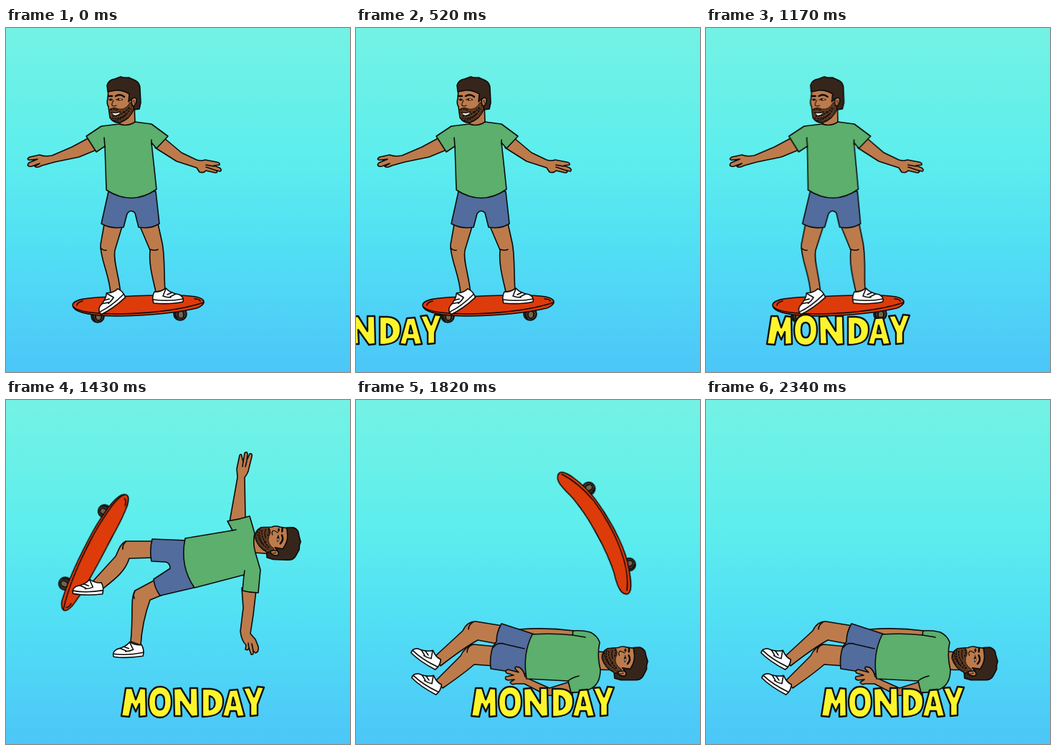
Animation, 480 px wide and 480 px high, one loop 2600 ms. Source, as an HTML page:

```html
<!DOCTYPE html>
<html lang="en">
<head>
<meta charset="utf-8">
<title>Weekend skater</title>
<style>
html, body { margin: 0; width: 100%; height: 100%; overflow: hidden; }
body { background: linear-gradient(#74f2e4, #5eeeed 36%, #52e0f4 62%, #4cc6f8); }
svg { display: block; width: 100vw; height: 100vh; }
.ink { stroke: #0c0b0a; stroke-width: 1.6; stroke-linejoin: round; stroke-linecap: round; }
.skin { fill: #bd7b4c; }
.shirt { fill: #5caf6c; }
.shorts { fill: #526c9d; }
.hair { fill: #36251b; }
.beard { fill: #5f3a22; }
.white { fill: #fff; }
.deck { fill: #de3b0b; }
.line { fill: none; }
.word { fill: #fdf52b; stroke: #111; stroke-width: 2.4; stroke-linejoin: round; fill-rule: evenodd; }

/* One beat is 130 ms, or 5% of the loop. */
.anim { animation: 2.6s step-end infinite; }
#stand { animation-name: stand; }
#fall { animation-name: fall; }
#lie { animation-name: lie; }
#board { animation-name: board; }
#flat { animation-name: flat; }
#bowed { animation-name: bowed; }
#words { animation-name: words; }
#sunday { animation-name: sunday; }
#monday { animation-name: monday; }
#sway { animation: sway 260ms step-end infinite; }

@keyframes sway {
  0%, 100% { transform: none; }
  50% { transform: matrix(1, 0, -.0167, 1, 6.2, 0); }
}
@keyframes stand {
  0% { transform: none; visibility: visible; }
  50% { transform: translate(262px, 185px) rotate(45deg) translate(-173px, -185px); visibility: visible; }
  55%, 100% { visibility: hidden; }
}
@keyframes fall {
  0%, 65%, 100% { visibility: hidden; transform: none; }
  55% { visibility: visible; transform: none; }
  60% { visibility: visible; transform: translate(-5px, 75px); }
}
@keyframes lie {
  0%, 100% { visibility: hidden; }
  65% { visibility: visible; }
}
@keyframes board {
  0% { transform: translate(185px, 387px); }
  50% { transform: translate(150px, 300px) rotate(60deg); }
  55% { transform: translate(122px, 212px) rotate(120deg); }
  60% { transform: translate(180px, 130px) rotate(160deg); }
  65% { transform: translate(255px, 104px) rotate(201deg); }
  70% { transform: translate(330px, 187px) rotate(241deg); }
  75% { transform: translate(373px, 241px) rotate(275deg); }
  80% { transform: translate(448px, 290px) rotate(320deg); }
  85% { transform: translate(520px, 320px) rotate(360deg); }
  90%, 100% { transform: translate(700px, 360px); }
}
@keyframes flat {
  0% { visibility: visible; }
  65%, 100% { visibility: hidden; }
}
@keyframes bowed {
  0%, 100% { visibility: hidden; }
  65% { visibility: visible; }
}
@keyframes words {
  0% { transform: translateX(-409px); }
  10% { transform: translateX(-353px); }
  15% { transform: translateX(-297px); }
  20% { transform: translateX(-241px); }
  25% { transform: translateX(-185px); }
  30% { transform: translateX(-129px); }
  35% { transform: translateX(-112px); }
  40% { transform: translateX(-97px); }
  45% { transform: translateX(-76px); }
  50% { transform: translateX(-36px); }
  55%, 100% { transform: none; }
}
@keyframes sunday {
  0% { visibility: visible; }
  40%, 100% { visibility: hidden; }
}
@keyframes monday {
  0%, 100% { visibility: hidden; }
  40% { visibility: visible; }
}
</style>
</head>
<body>
<svg viewBox="0 0 480 480">
  <defs>
    <g id="wheel" class="ink">
      <circle r="9" fill="#3b3832"/>
      <ellipse cx="1" cy="1" rx="4" ry="5" fill="#74644c"/>
      <path class="line" d="M-5 -5Q-9 1 -4 6"/>
    </g>

    <g id="shoe" class="ink">
      <path class="white" d="M-8 1Q0 2 8 -4Q14 3 27 5Q34 9 32 15Q15 19 -9 17Q-12 9 -8 1Z"/>
      <path class="line" d="M-10 12Q14 15 32 11M8 -3L4 7Q9 9 15 9M10 5L17 2M14 8L22 4"/>
    </g>

    <!-- centred between ear and nose -->
    <g id="head" class="ink">
      <path class="skin" d="M-20 -15L-21 -2Q-23 5 -20 10L-18 25Q-13 33 -4 32Q10 27 15 14L15 -15Z"/>
      <path class="beard" stroke-width=".8" d="M-19 14Q-13 9 -6 13Q4 15 10 4L13 5L13 15Q6 29 -7 31Q-16 30 -18 24Z"/>
      <path class="line" stroke-dasharray="1.5 2.5" d="M-15 26Q-4 28 6 19M-12 29Q2 28 10 13M2 18L10 10M-17 14Q-12 12 -7 15M-14 23Q-4 24 3 15"/>
      <path class="line" stroke-width="1.2" d="M-16 18Q-10 20 -4 17"/>
      <path class="line" stroke-width="2.5" d="M-20 -5L-15 -5M-10 -5Q-4 -9 2 -4"/>
      <path class="white" stroke-width=".9" d="M-19 0Q-17 -2 -14 0Q-17 2 -19 0ZM-9 0Q-5 -3 0 0Q-5 2 -9 0Z"/>
      <path class="line" stroke-width="2.6" d="M-17 -.2v.4M-6 -.4v.5"/>
      <path class="line" stroke-width="1.1" d="M-13 1Q-16 6 -15 8Q-12 10 -9 8"/>
      <path class="hair" d="M-21 -11L-22 -20Q-20 -28 -11 -29L-3 -32Q2 -30 8 -31L17 -27Q24 -24 24 -15L25 4L23 13L16 14L12 -1L8 3L9 -8Q-1 -14 -10 -13Z"/>
      <path class="skin" d="M12 0Q16 -5 19 -1Q20 5 15 9Q12 8 12 0Z"/>
      <path class="line" stroke-width=".9" d="M14 2Q17 -1 16 5"/>
    </g>

    <g id="nday">
      <path d="M235 441L234 403L244 402L257 423L257 402L267 402L268 441L259 442L244 421L245 441Z"/>
      <path d="M274 403L285 403C299 404 304 412 303 423C302 436 294 442 274 442ZM284 413L284 432C294 431 294 415 284 413Z"/>
      <path d="M312 405L323 404L333 441L323 442L321 434L313 434L311 442L302 441ZM317 415L315 426L320 426Z"/>
      <path d="M331 402L340 401L346 414L351 400L360 401L351 425L351 440L341 441L341 425Z"/>
    </g>
  </defs>

  <g id="board" class="anim">
    <g id="flat" class="anim ink">
      <use href="#wheel" x="-57" y="15"/>
      <use href="#wheel" x="58" y="12"/>
      <path class="deck" d="M-92 0C-92 -8 -75 -11 -35 -12C15 -14 55 -16 80 -12C95 -9 94 -1 81 4C55 10 20 14 -25 15C-65 15 -91 10 -92 0Z"/>
      <path class="line" d="M-91 2C-85 9 -60 12 -25 12C20 11 60 6 91 -4M-86 0Q-86 -4 -78 -6M86 -6Q85 -9 78 -9"/>
    </g>
    <g id="bowed" class="anim ink">
      <use href="#wheel" x="-62" y="24"/>
      <use href="#wheel" x="58" y="26"/>
      <path class="deck" d="M-97 3C-95 -6 -84 -6 -62 0C-30 7 30 7 62 -1C82 -7 94 -9 97 1C98 9 72 22 40 27C10 31 -30 31 -57 24C-77 18 -97 11 -97 3Z"/>
      <path class="line" d="M-92 4C-80 13 -67 17 -52 21C-20 28 10 28 40 24C65 19 82 11 94 3"/>
    </g>
  </g>

  <g id="stand" class="anim ink">
    <g id="sway">
      <path class="skin" d="M137 274L132 302C131 322 145 345 146 372L160 372C158 345 149 325 152 310L162 277Z"/>
      <path class="skin" d="M187 277L201 310C199 330 205 350 209 368L222 366C220 345 222 320 218 300L212 273Z"/>
      <path class="line" d="M132 307Q136 311 140 310M201 309Q208 311 212 309"/>
      <use href="#shoe" transform="translate(149 368) scale(-1 1) rotate(38)"/>
      <use href="#shoe" x="215" y="367"/>
      <path class="shorts" d="M143 228L133 273Q147 281 164 278L169 259Q174 252 180 258L185 278Q202 281 214 273L209 228Z"/>
      <path class="skin" d="M118 152L92 166L64 178Q54 180 47 177L33 180C28 183 31 185 35 184L44 183L32 188C28 192 32 194 36 193L47 189L40 193Q43 196 50 192L68 187L102 180L131 168Z"/>
      <path class="skin" d="M208 167L238 186L266 195L270 201Q276 203 279 199L292 202Q296 202 294 199L299 200Q302 198 298 195L290 192L298 191Q299 188 294 187L278 184Q272 186 266 184L245 174L220 153Z"/>
      <path class="line" d="M279 194L294 199M279 191L290 193"/>
      <path class="skin" d="M159 124L159 134Q171 140 180 133L179 104Z"/>
      <use href="#head" x="163" y="100"/>
      <path class="white" stroke-width="1" d="M147 118Q153 120 160 117Q157 123 151 122Z"/>
      <path class="shirt" d="M158 134L133 137L112 151L126 173L138 165L140 226Q176 249 210 225L203 160L210 168L226 151L203 134L180 131Q170 138 158 134Z"/>
      <path class="line" d="M138 166L137 153M203 162L203 156"/>
    </g>
  </g>

  <g id="fall" class="anim ink">
    <path class="skin" d="M206 197L167 197C159 201 157 210 153 218L122 252L133 265C152 250 166 240 172 221L206 220Z"/>
    <path class="skin" d="M210 250L180 266C173 277 178 300 174 337L188 342C190 310 197 290 201 279L218 272Z"/>
    <path class="line" d="M167 198Q162 203 163 208M180 266Q177 272 179 277"/>
    <use href="#shoe" transform="translate(125 254) scale(-1 1) rotate(2)"/>
    <use href="#shoe" transform="translate(181 341) scale(-1 1) rotate(4)"/>
    <path class="shorts" d="M204 194L254 196L262 262L215 273Q207 262 206 250L229 235Q229 227 222 226L203 225Q200 210 204 194Z"/>
    <path class="skin" d="M312 170L323 108L322 96L326 77Q329 74 329 79L331 86L333 74Q337 71 337 76L336 84L340 75Q344 74 343 79L339 95Q338 102 333 108L334 166Z"/>
    <path class="line" d="M331 86L330 93M336 85L334 93"/>
    <path class="skin" d="M329 262L331 290L327 323Q329 337 335 342L334 348Q338 350 339 346L342 355Q346 356 345 350L348 353Q353 352 352 344L348 334L341 326L345 300L349 265Z"/>
    <path class="line" d="M339 346L338 339M345 350L343 340"/>
    <path class="skin" d="M344 187L360 190L374 215L346 213Z"/>
    <use href="#head" transform="translate(379 198) rotate(95)"/>
    <path class="shirt" d="M309 169Q325 167 340 162L347 186Q344 200 348 213L355 237L352 269Q341 269 330 266L332 244L263 262Q242 232 250 193L316 182Z"/>
    <path class="line" d="M316 182L321 181M332 245L333 238"/>
  </g>

  <g id="lie" class="anim ink">
    <path class="skin" d="M228 320Q265 317 304 322L304 330L240 328Z"/>
    <path class="skin" d="M204 315L167 309Q155 309 149 322L111 357L118 371Q150 346 170 335L202 341Z"/>
    <path class="skin" d="M195 344L164 341Q152 344 146 357L112 391L121 402Q150 382 165 369L192 371Z"/>
    <path class="line" d="M163 310Q157 314 157 320M162 341Q155 345 155 352"/>
    <use href="#shoe" transform="translate(112 357) scale(-1 1) rotate(-32)"/>
    <use href="#shoe" transform="translate(113 392) scale(-1 1) rotate(-32)"/>
    <path class="shorts" d="M203 312L252 328L240 383L188 375Q186 359 191 344L196 337Q196 324 203 312Z"/>
    <path class="line" d="M192 345Q197 337 209 341L235 347"/>
    <path class="skin" d="M336 351L354 352L368 376Q352 377 338 376Z"/>
    <use href="#head" transform="translate(375 366) rotate(93)"/>
    <path class="skin" d="M236 386Q234 377 228 373Q221 371 222 375L227 380L212 376Q207 378 210 381L220 384L209 386Q207 390 212 391L221 390L215 394Q217 398 222 396L235 396L266 412L302 414L302 392L270 402L243 390Z"/>
    <path class="shirt" d="M246 327Q275 325 302 328L303 322Q316 321 327 324Q337 329 340 338Q336 357 341 376Q341 398 325 404Q312 409 300 408L296 392L238 389Q232 355 246 327Z"/>
    <path class="line" d="M302 328L320 331M296 392Q302 387 311 385"/>
  </g>

  <g id="words" class="anim word">
    <use href="#nday"/>
    <g id="sunday" class="anim" role="img" aria-label="Sunday">
      <path d="M196 409C190 396 168 397 168 411C168 422 187 422 187 430C187 436 177 436 172 430L167 439C176 449 199 447 198 430C198 417 180 416 180 410C180 406 187 407 190 414Z"/>
      <path d="M202 403L212 403L212 426C212 436 221 436 221 426L221 402L231 402L231 427C231 449 202 449 202 427Z"/>
    </g>
    <g id="monday" class="anim" role="img" aria-label="Monday">
      <path d="M161 441L167 402L176 402L181 418L187 402L195 403L196 441L186 442L186 424L181 435L176 424L172 442Z"/>
      <path d="M215 400C226 400 231 409 231 421C231 434 225 443 215 443C204 443 199 434 199 421C199 409 205 400 215 400ZM215 411C211 411 209 415 209 421C209 428 211 432 215 432C219 432 221 428 221 421C221 415 219 411 215 411Z"/>
    </g>
  </g>
</svg>
</body>
</html>
```
